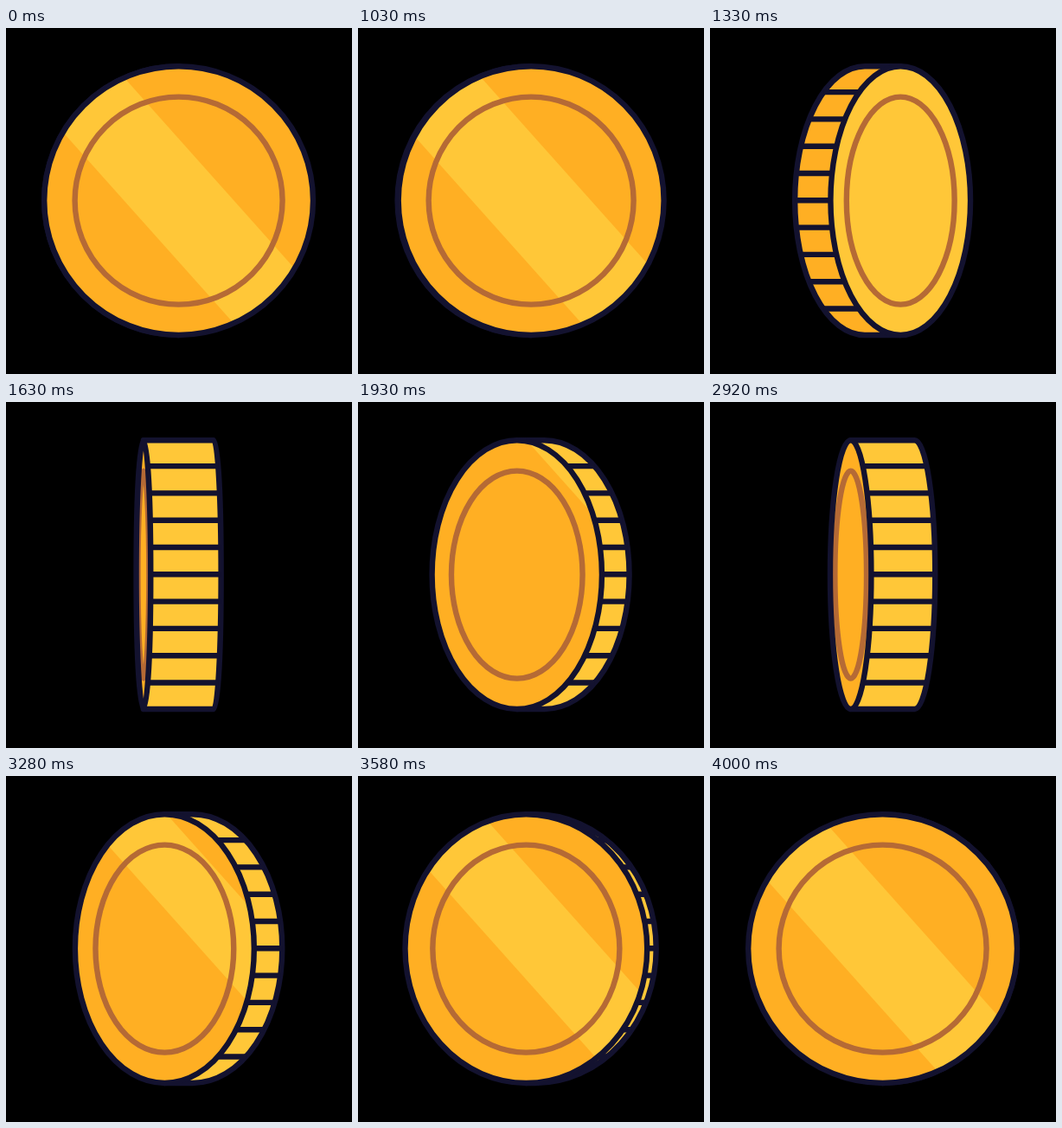
Recreate the animation shown at these times as an HTML page. Size 400 by 400 pixels, loop 4030 ms.

```html
<!DOCTYPE html>
<html lang="en">
<head>
<meta charset="utf-8">
<title>Spinning coin</title>
<style>
  html, body { margin: 0; width: 100%; height: 100%; overflow: hidden; background: #000; }
  svg { display: block; width: 100%; height: 100%; }
</style>
</head>
<body>
<svg viewBox="0 0 400 400">
  <defs><clipPath id="faceClip"><ellipse id="clip"/></clipPath></defs>
  <g stroke="#13122f" stroke-width="6.4" stroke-linejoin="round">
    <path id="body"/>
    <path id="ridges" fill="none"/>
  </g>
  <ellipse id="face" fill="#ffaf23"/>
  <path id="shine" fill="#ffc738" clip-path="url(#faceClip)"/>
  <ellipse id="ring" fill="none" stroke="#b56a35" stroke-width="6.4"/>
  <ellipse id="rim" fill="none" stroke="#13122f" stroke-width="6.4"/>
</svg>
<script>
const LOOP = 4030, STEP = 30;
const CENTER = 199.6, RADIUS = 155.4, RING = 120, THICKNESS = 86;
const RIDGE_GAP = 31.3, SHINE_SLOPE = 1.12;
const ORANGE = '#ffaf23', LIGHT = '#ffc738';

const el = id => document.getElementById(id);
const set = (id, attrs) => {
  for (const name in attrs) el(id).setAttribute(name, attrs[name]);
};

function bezier(x1, y1, x2, y2) {
  const at = (a, b, u) => 3 * a * u * (1 - u) ** 2 + 3 * b * u * u * (1 - u) + u ** 3;
  return x => {
    if (x <= 0) return 0;
    if (x >= 1) return 1;
    let lo = 0, hi = 1;
    for (let i = 0; i < 24; i++) {
      const mid = (lo + hi) / 2;
      if (at(x1, x2, mid) < x) lo = mid; else hi = mid;
    }
    return at(y1, y2, lo);
  };
}

const closing = bezier(.2, 0, .833, .833);
const settle = bezier(.17, .17, .37, 1);
const settleDepth = bezier(.17, .17, .45, 1);

// turn: 0 = facing, 1 = edge on; side: 1 = face to the right of the edge.
// low and high move the two borders of the shine per unit of turn.
function pose(t) {
  if (t < 1600) {
    const turn = closing((t - 1000) / 600);
    return { turn, depth: turn, side: 1, low: -420, high: 420 };
  }
  if (t < 2200) {
    const turn = closing((2200 - t) / 600);
    return { turn, depth: turn, side: -1, low: 578, high: 578 };
  }
  if (t < 2800) {
    const turn = closing((t - 2200) / 600);
    return { turn, depth: turn, side: 1, low: -420, high: 420 };
  }
  const x = (t - 2800) / 1200;
  return { turn: 1 - settle(x), depth: 1 - settleDepth(x), side: -1, low: 312, high: 231 };
}

function draw(t) {
  const { turn, depth, side, low, high } = pose(t);
  const scale = 1 - turn;
  const rx = RADIUS * scale;
  const half = side * THICKNESS * depth / 2;
  const faceX = CENTER + half, backX = CENTER - half;
  const top = CENTER - RADIUS, bottom = CENTER + RADIUS;

  set('body', {
    fill: side > 0 ? ORANGE : LIGHT,
    d: `M${faceX} ${top}H${backX}A${rx} ${RADIUS} 0 0 ${side > 0 ? 0 : 1} ${backX} ${bottom}H${faceX}Z`
  });

  let ridges = '';
  for (let i = -4; i <= 4; i++) {
    const dy = i * RIDGE_GAP;
    const reach = side * rx * Math.sqrt(1 - (dy / RADIUS) ** 2);
    ridges += `M${backX - reach} ${CENTER - .3 + dy}H${faceX - reach}`;
  }
  set('ridges', { d: depth > .01 ? ridges : '' });

  const disc = { cx: faceX, cy: CENTER, rx, ry: RADIUS };
  for (const id of ['clip', 'face', 'rim']) set(id, disc);
  set('ring', { cx: faceX, cy: CENTER, rx: RING * scale, ry: RING });

  const lowX = faceX - 63 + low * turn, highX = faceX + 64 + high * turn;
  const lean = 200 / SHINE_SLOPE;
  set('shine', {
    d: `M${lowX - lean} ${CENTER - 200}H${highX - lean}L${highX + lean} ${CENTER + 200}H${lowX + lean}Z`
  });
}

const start = performance.now();
function tick() {
  const t = (performance.now() - start) % LOOP;
  const stepped = Math.floor((t - 10) / STEP) * STEP + 10;
  draw(stepped < 1030 ? 1000 : Math.min(stepped, 4000));
  requestAnimationFrame(tick);
}
tick();
</script>
</body>
</html>
```
